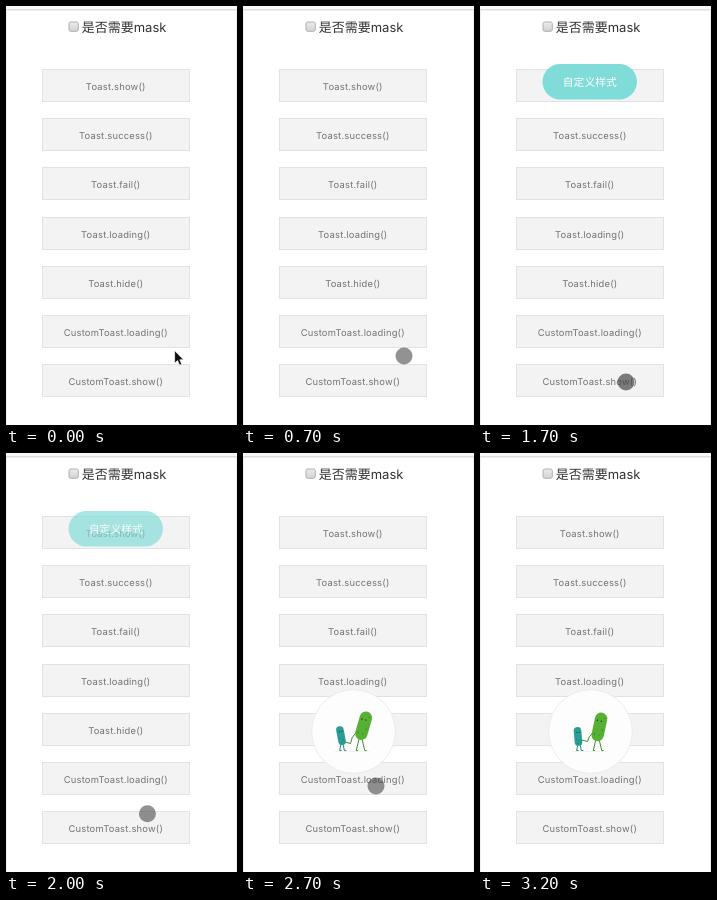
An HTML page for the animation above (3.3 s loop, 231 by 419 pixels).

```html
<!DOCTYPE html>
<html lang="zh-CN">
<head>
<meta charset="utf-8">
<title>Toast demo</title>
<style>
html, body { margin: 0; width: 100%; height: 100%; overflow: hidden; background: #fff; }
svg { display: block; width: 231px; height: 419px; }
text {
  font-family: Inter, "Noto Sans CJK SC", "Noto Sans CJK", sans-serif;
  text-rendering: geometricPrecision;
}
.label { font-size: 9.4px; letter-spacing: .2px; fill: #737373; text-anchor: middle; }
.title { font-size: 13px; fill: #333; }
.pill { font-size: 10.8px; fill: #fff; text-anchor: middle; }
.limb { fill: none; stroke-width: 1; stroke-linecap: round; stroke-linejoin: round; }
.teal { stroke: #27877f; }
.green { stroke: #3f8f2e; }
</style>
</head>
<body>
<svg viewBox="0 0 231 419">
  <defs>
    <linearGradient id="box" x2="0" y2="1">
      <stop stop-color="#ececec"/><stop offset="1" stop-color="#d2d2d2"/>
    </linearGradient>
  </defs>
  <rect width="231" height="419" fill="#fff"/>
  <rect width="231" height="3" fill="#f8f8f8"/>
  <rect y="3" width="231" height="1.5" fill="#dfdfdf"/>
  <path d="M.5 4V419M230.5 4V419" stroke="#efefef"/>

  <rect x="63" y="16" width="9.3" height="9.3" rx="1.8" fill="url(#box)" stroke="#a9a9a9" stroke-width=".9"/>
  <text class="title" x="75.7" y="26">是否需要mask</text>
  <g id="buttons"></g>

  <g id="pill">
    <rect x="62.5" y="58" width="94.5" height="35.5" rx="17.75" fill="#7fdcd9"/>
    <text class="pill" x="109.8" y="80">自定义样式</text>
  </g>

  <g id="loader">
    <circle cx="110.5" cy="278.5" r="41.8" fill="#fdfdfd" stroke="#ececec"/>
    <path d="M92 298.5H126" stroke="#eef1ee"/>
    <path id="smallLegs" class="limb teal"/>
    <path id="bigLegs" class="limb green"/>
    <path id="arm" class="limb green"/>
    <g id="small">
      <rect x="-3.8" y="-9.5" width="7.6" height="19" rx="3.8" fill="#2a9d94"/>
      <path d="M-2 2l1 1M1 5l1-1M-1 7h1" stroke="#1c746e" stroke-width=".8"/>
      <path d="M-1-4h.1M1.6-4h.1" stroke="#173f3c" stroke-width="1.2" stroke-linecap="round"/>
    </g>
    <g id="big">
      <rect x="-6.2" y="-14.5" width="12.4" height="29" rx="6.2" fill="#55b034"/>
      <path d="M-4 7l1 2M1 9l1-1.5M3 2l1 1.5M3-10l1 1" stroke="#35851f" stroke-width=".9"/>
      <path d="M-3.5-6h.1M.6-6h.1" stroke="#234d19" stroke-width="1.5" stroke-linecap="round"/>
    </g>
  </g>

  <circle id="touch" r="8.5" fill="#404040"/>
  <path id="arrow" d="M0 0V12.6L2.9 10L5 14.6L7.2 13.6L5.2 9.2H9Z" fill="#111" stroke="#fff" stroke-width=".7"/>
</svg>
<script>
const LOOP = 3300, STEP = 100;
const $ = id => document.getElementById(id);

const names = ["Toast.show()", "Toast.success()", "Toast.fail()", "Toast.loading()",
  "Toast.hide()", "CustomToast.loading()", "CustomToast.show()"];
$("buttons").innerHTML = names.map((name, i) => {
  const y = 63.5 + Math.round(i * 49.2);
  return `<rect x="36.5" y="${y}" width="147" height="32" fill="#f3f3f3" stroke="#e2e2e2"/>
    <text class="label" x="109.8" y="${y + 20}">${name}</text>`;
}).join("");

const ramp = (t, from, to) => Math.min(1, Math.max(0, (t - from) / (to - from)));
const ease = (t, from, to) => {
  const k = ramp(t, from, to);
  return k * k * (3 - 2 * k);
};
const mix = (a, b, k) => a.map((v, i) => v + (b[i] - v) * k);

function place(id, [x, y], angle = 0) {
  $(id).setAttribute("transform", `translate(${x} ${y}) rotate(${angle})`);
}

function fade(id, alpha) {
  $(id).style.opacity = alpha;
}

function legs(id, x, y, spread, swing) {
  const leg = s => `M${x + s * spread} ${y}L${x + s * (spread + swing)} 297.5h1.5`;
  $(id).setAttribute("d", leg(-1) + leg(1));
}

function movePointer(t) {
  place("arrow", mix([168.6, 344.6], [232, 364], ramp(t, 0, 300)));
  fade("arrow", t < 300 ? 1 : 0);

  let spot = mix([229, 367], [161, 350], ramp(t, 300, 700));
  spot = mix(spot, [146, 376], ease(t, 700, 1100));
  spot = mix(spot, [133, 333], ease(t, 1800, 2300));
  place("touch", spot);
  const press = ramp(t, 1100, 1300) - ramp(t, 1900, 2000);
  fade("touch", (.57 + .1 * press) * (ramp(t, 300, 500) - ramp(t, 3000, 3200)));
}

function walk(t) {
  const phase = (t - 2700) / 500 * Math.PI;
  const sway = Math.cos(phase), swing = 1.5 + Math.sin(phase * 2 + 1) * 1.5;
  place("big", [120 + sway * .6, 273.3 - sway * .6], 14 + sway * 2);
  place("small", [98, 283 - sway * .4], -8 - sway * 3);
  legs("bigLegs", 117.5, 286, 1.5, swing);
  legs("smallLegs", 99, 291, 1, swing * .5);
  $("arm").setAttribute("d", `M113.5 279Q108 284 107.5 ${289.5 + sway}L102 ${288 + sway}`);
}

function draw(now) {
  const t = Math.floor(now % LOOP / STEP) * STEP;
  movePointer(t);
  fade("pill", ramp(t, 1300, 1600) - ramp(t, 1900, 2200));
  fade("loader", ease(t, 2300, 2700));
  walk(t);
}

const start = performance.now();
function tick() {
  draw(performance.now() - start);
  requestAnimationFrame(tick);
}
tick();
</script>
</body>
</html>
```
